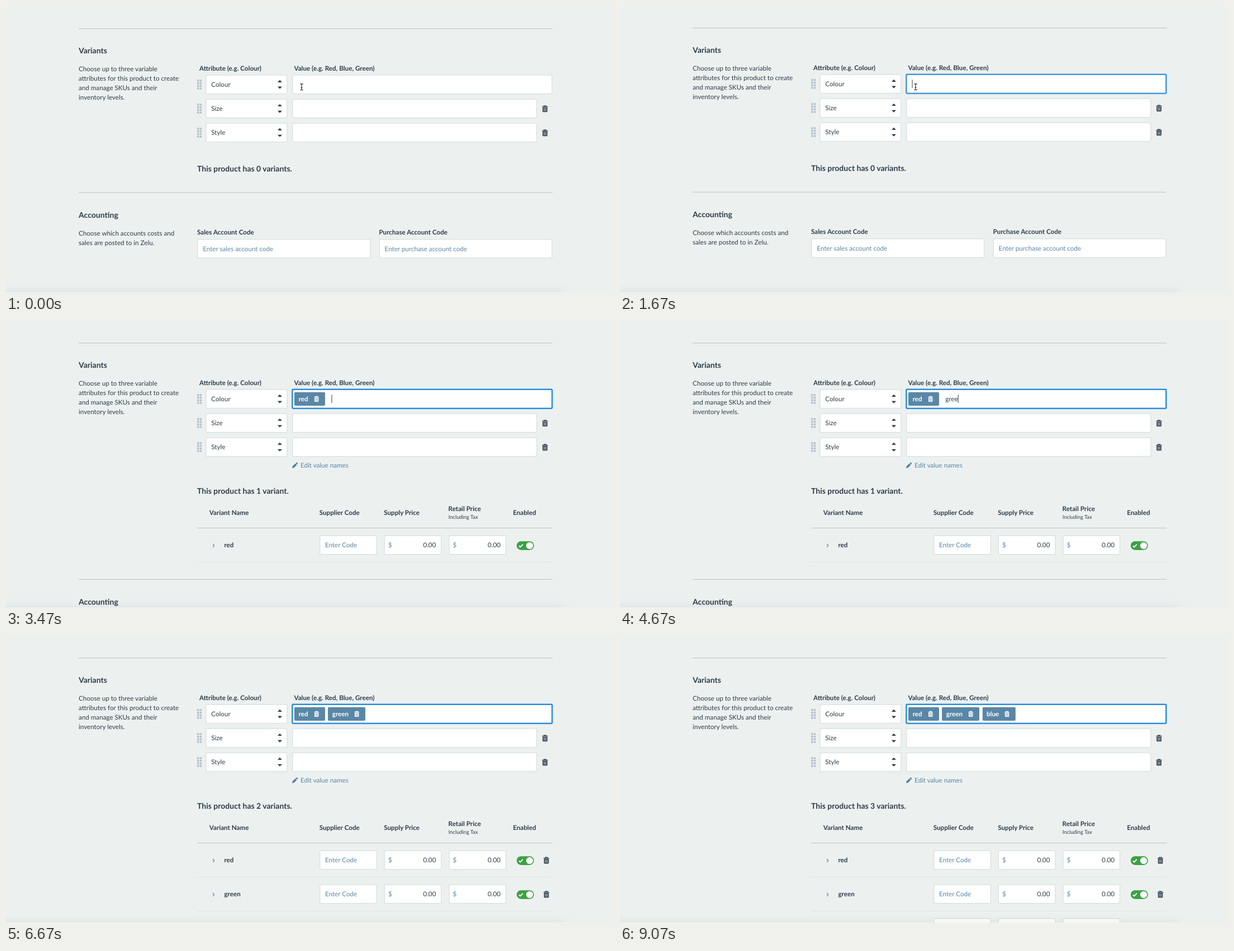
Animation of 1088 by 515 pixels, one loop 9140 ms. Source, as an HTML page:

```html
<!DOCTYPE html>
<html lang="en">
<head>
<meta charset="utf-8">
<title>Product variants form</title>
<style>
  html, body { margin: 0; width: 100%; height: 100%; overflow: hidden; background: #ecf1f0; }
  svg { display: block; width: 1088px; height: 515px; }
  text { font: 400 11.65px Lato, "Open Sans", sans-serif; fill: #2f3c48; text-rendering: geometricPrecision; }
  .b { font-weight: 700; }
  .h { font-weight: 700; font-size: 14px; }
  .s { font-size: 9.3px; }
  .p { fill: #5b86a5; }
  .w { font-weight: 700; fill: #fff; }
  .box { fill: #fff; stroke: #dce3e5; stroke-width: 1.5; }
  .rule { stroke: #b8c3c4; stroke-width: 1; }
  .dots { stroke: #d3dbdc; stroke-width: 1; stroke-dasharray: 1 1; }
</style>
</head>
<body>
<svg id="stage" viewBox="0 0 1088 515">
  <defs>
    <filter id="soft" x="-10%" y="-200%" width="120%" height="500%"><feGaussianBlur stdDeviation="9"/></filter>
    <g id="bin">
      <path d="M-5.2-3.8H5.2M-2-4V-5.4H2V-4" fill="none" stroke="currentColor" stroke-width="1.3"/>
      <path d="M-4.3-2.6H4.3V4.6Q4.3 5.8 3.1 5.8H-3.1Q-4.3 5.8-4.3 4.6Z" fill="currentColor"/>
      <path d="M-2-1.4V4.4M0-1.4V4.4M2-1.4V4.4" stroke="var(--gap)" stroke-width=".8"/>
    </g>
  </defs>
</svg>
<script>
const LOOP = 9140, FOCUS = 1600;
const stage = document.getElementById('stage');

function el(parent, tag, attrs = {}, content) {
  const node = document.createElementNS('http://www.w3.org/2000/svg', tag);
  for (const k in attrs) node.setAttribute(k, attrs[k]);
  if (content !== undefined) node.textContent = content;
  parent.append(node);
  return node;
}
const group = parent => el(parent, 'g');
const label = (parent, x, y, str, cls = '') => el(parent, 'text', { x, y, class: cls }, str);
const right = (parent, x, y, str) => el(parent, 'text', { x, y, 'text-anchor': 'end' }, str);
const box = (parent, x, y, width, height = 33.5) =>
  el(parent, 'rect', { x, y, width, height, rx: 1, class: 'box' });
const line = (parent, x1, y, cls) => el(parent, 'line', { x1, x2: 978, y1: y, y2: y, class: cls });
const bin = (parent, x, y, color, gap, size = 1) => el(parent, 'use', {
  href: '#bin', transform: `translate(${x} ${y}) scale(${size})`, style: `color:${color};--gap:${gap}`
});
const show = (node, on) => node.setAttribute('visibility', on ? 'inherit' : 'hidden');
const lines = (parent, x, y, list) => list.forEach((s, i) => label(parent, x, y + i * 17, s));

const page = group(stage);

// Variants section
line(page, 130, 39.5, 'rule');
label(page, 130, 84.3, 'Variants', 'h');
lines(page, 130, 116.2, ['Choose up to three variable', 'attributes for this product to create',
  'and manage SKUs and their', 'inventory levels.']);
label(page, 346, 114.7, 'Attribute (e.g. Colour)', 'b');
label(page, 515.5, 114.7, 'Value (e.g. Red, Blue, Green)', 'b');

['Colour', 'Size', 'Style'].forEach((name, i) => {
  const mid = 139.7 + i * 43.2;
  for (let d = 0; d < 8; d++)
    el(page, 'rect', { x: 342 + d % 2 * 4.7, y: mid - 8.6 + (d >> 1) * 4.7, width: 3.4, height: 3.4, fill: '#b3c0c9' });
  box(page, 358, mid - 16.7, 145);
  label(page, 367.3, mid + 4.3, name);
  el(page, 'path', { d: `M486 ${mid - 3.8}l4-4.2 4 4.2zM486 ${mid + 3.8}l4 4.2 4-4.2z`, fill: '#2f3c48' });
  box(page, 512.7, mid - 16.7, i ? 437 : 464.3);
  if (i) bin(page, 964.5, mid + .6, '#2f3c48', '#ecf1f0');
});

// Focused field
const glow = el(page, 'rect', { x: 511, y: 121.4, width: 467.6, height: 36.8, rx: 2.5, fill: 'none', stroke: '#8cc4f0', 'stroke-width': 1 });
const ring = el(page, 'rect', { x: 512.4, y: 122.7, width: 464.8, height: 34, rx: 1.5, fill: 'none', stroke: '#1280dc', 'stroke-width': 2 });
const chips = [['red', 516, 55, 523.7], ['green', 576, 67, 583.8], ['blue', 648.8, 59, 656]].map(([name, x, w, tx]) => {
  const g = group(page);
  el(g, 'rect', { x, y: 127.7, width: w, height: 24.2, rx: 2, fill: '#5a87a6' });
  label(g, tx, 144, name, 'w');
  bin(g, x + w - 15.3, 140, '#fff', '#5a87a6', .86);
  return g;
});
const typed = label(page, 522.3, 144, '');
const caret = el(page, 'rect', { y: 132.3, width: 1, height: 14.6, fill: '#2f3c48' });

// Summary and table
const title = label(page, 342, 296, '', 'h');
const table = group(page);
el(table, 'path', { d: 'M512 264l.7-3.3 5-5 2.6 2.6-5 5zM518.4 255l1.1-1.1q.6-.5 1.2 0l1.3 1.3q.5.6 0 1.2l-1 1.1z', fill: '#4f7e9e' });
label(table, 527, 262.8, 'Edit value names', 'p');
[['Variant Name', 363.8, 347.5], ['Supplier Code', 560.7, 347.5], ['Supply Price', 676.2, 347.5],
 ['Retail Price', 791.6, 340.7], ['Enabled', 907.2, 347.5]].forEach(([s, x, y]) => label(table, x, y, s, 'b'));
label(table, 791.8, 355.4, 'Including Tax', 's');
line(table, 342, 371.5, 'rule');

const rows = ['red', 'green', 'blue'].map((name, i) => {
  const mid = 402 + i * 61, g = group(table);
  el(g, 'path', { d: `M370 ${mid - 2}l2.8 3-2.8 3`, fill: 'none', stroke: '#5a87a6', 'stroke-width': 1.1 });
  label(g, 390.4, mid + 4.2, name, 'b');
  [561.7, 677.3, 793].forEach(x => box(g, x, mid - 16.8, 101.5));
  label(g, 571, mid + 4.2, 'Enter Code', 'p');
  [684, 799.6].forEach(x => {
    label(g, x, mid + 3.7, '$', 'p');
    right(g, x + 85.4, mid + 4.2, '0.00');
  });
  el(g, 'rect', { x: 913.8, y: mid - 6.7, width: 31, height: 15.6, rx: 7.8, fill: '#3da144' });
  el(g, 'circle', { cx: 937, cy: mid + 1.1, r: 6.2, fill: '#fff' });
  el(g, 'path', { d: `M917.8 ${mid + 1.3}l2.4 2.4 4.6-4.8`, fill: 'none', stroke: '#fff', 'stroke-width': 1.8 });
  line(g, 342, mid + 30.5, 'dots');
  return { g, bin: bin(g, 967, mid + .6, '#2f3c48', '#ecf1f0') };
});

// Accounting section
const accounts = group(page);
line(accounts, 130, 334, 'rule');
label(accounts, 130, 379, 'Accounting', 'h');
lines(accounts, 130, 410.8, ['Choose which accounts costs and', 'sales are posted to in Zelu.']);
[['Sales', 342], ['Purchase', 667.4]].forEach(([kind, x]) => {
  label(accounts, x, 409.2, `${kind} Account Code`, 'b');
  box(accounts, x + .9, 417.7, 308.7);
  label(accounts, x + 10.2, 438.6, `Enter ${kind.toLowerCase()} account code`, 'p');
});

// Soft shade along the bottom edge
el(stage, 'rect', { x: -60, y: 512, width: 1064, height: 40, rx: 12, fill: '#3c5058', opacity: .09, filter: 'url(#soft)' });
el(stage, 'rect', { x: 0, y: 514, width: 1008, height: 1, fill: '#f7f9f9', opacity: .8 });

const pointer = el(stage, 'path', {
  d: 'M526.3 139.6Q529 139.6 529 141.2Q529 139.6 531.7 139.6M529 141V149.5M526.3 150.8Q529 150.8 529 149.2Q529 150.8 531.7 150.8M527.6 146.5H530.4',
  fill: 'none', stroke: '#222', 'stroke-width': 1.1
});

// time, number of chips, typed text, caret shown
const steps = [
  [0, 0, '', 0], [1600, 0, '', 1], [2070, 0, '', 0],
  [2470, 0, 'r', 1], [2600, 0, 're', 1], [2870, 0, 'red', 1], [3330, 0, 'red', 0],
  [3470, 1, '', 1], [3930, 1, '', 0],
  [4070, 1, 'g', 1], [4330, 1, 'gr', 1], [4400, 1, 'gre', 1], [4670, 1, 'gree', 1], [5130, 1, 'gree', 0],
  [5530, 1, 'green', 1], [6000, 1, 'green', 0],
  [6130, 2, '', 1], [6670, 2, '', 0],
  [6800, 2, 'b', 1], [7070, 2, 'bl', 1], [7200, 2, 'blu', 1], [7470, 2, 'blue', 1], [8000, 2, 'blue', 0],
  [8330, 3, '', 1], [8800, 3, '', 0]
];
const textX = [522.3, 582.3, 654.4, 720];
let last = null;

function apply(step) {
  const [, n, str, on] = step, x = textX[n];
  typed.textContent = str;
  typed.setAttribute('x', x);
  caret.setAttribute('x', x + (str ? typed.getComputedTextLength() : 0.2));
  show(caret, on);
  title.textContent = `This product has ${n} variant${n === 1 ? '' : 's'}.`;
  title.setAttribute('y', n ? 309.7 : 296);
  show(table, n);
  chips.forEach((c, i) => show(c, i < n));
  rows.forEach((r, i) => {
    r.g.setAttribute('display', i < n ? 'inline' : 'none');
    show(r.bin, n > 1);
  });
  accounts.setAttribute('transform', `translate(0 ${n ? 68.5 + 61 * n : 0})`);
}

function draw() {
  const t = performance.now() % LOOP;
  const step = steps.findLast(s => s[0] <= t);
  if (step !== last) apply(last = step);
  const focus = t < FOCUS ? 0 : t < 1665 ? .5 : t < 1730 ? .88 : 1;
  ring.setAttribute('opacity', focus);
  glow.setAttribute('opacity', focus * .5);
  page.setAttribute('transform', `translate(0 ${t < FOCUS ? 1 : 0})`);
  show(pointer, t < 2470);
  requestAnimationFrame(draw);
}
draw();
</script>
</body>
</html>
```
